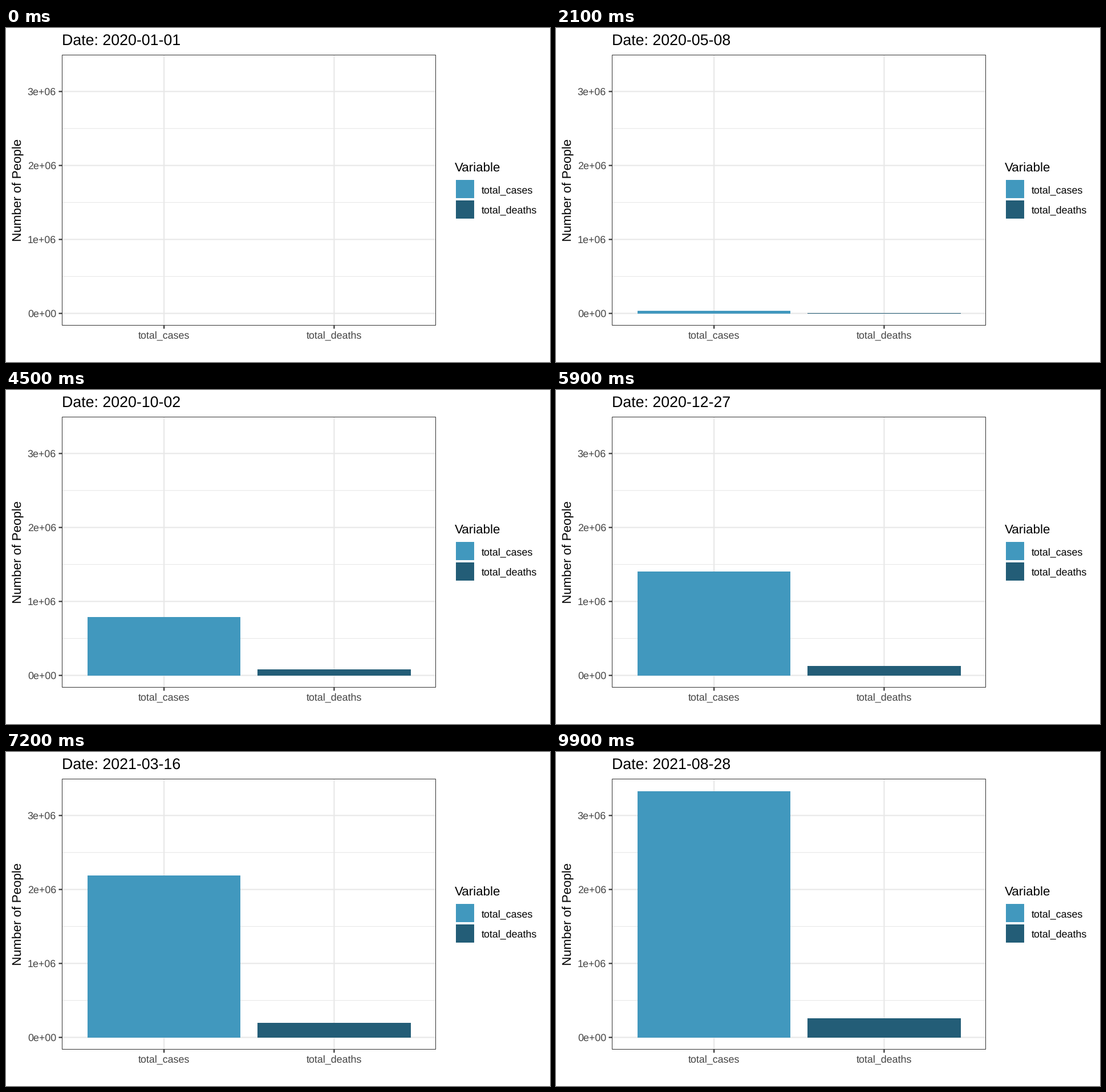
Write a matplotlib script that moves like this. It is 954 px wide and 587 px high and loops after 10 s.

```python
import numpy as np
import matplotlib
import matplotlib.pyplot as plt
from matplotlib.animation import FuncAnimation
from matplotlib.patches import Rectangle

matplotlib.rcParams["font.family"] = "Liberation Sans"
matplotlib.rcParams["text.hinting"] = "none"

W, H, DPI = 954, 587, 128
PT = 72 / DPI  # points per pixel
FRAMES, LAST_DAY = 100, 605
STEP = LAST_DAY / (FRAMES - 1)
START = np.datetime64("2020-01-01")

LIGHT, DARK = "#4198BE", "#235D77"
GRID, INK, LABEL = "#E8E8E8", "#333333", "#444444"
SMALL, MEDIUM, LARGE = 17.9, 22.4, 26.8

LEFT, RIGHT, TOP, BOTTOM = 98, 754, 47, 523
ZERO, UNIT = 501.6, 0.13  # baseline and pixels per thousand people
CENTERS, BAR_W = (277.1, 575.4), 268.4
NAMES, COLORS = ("total_cases", "total_deaths"), (LIGHT, DARK)

# Turning points of the waves, totals in thousands
DAYS = np.array([0, 80, 130, 165, 225, 278, 320, 363, 397, 443, 486, 534,
                 567, LAST_DAY])
CASES = np.array([0, 0, 35, 146, 502, 790, 1012, 1402, 1870, 2188, 2348,
                  2472, 2694, 3329])
DEATHS = np.array([0, 0, 3.5, 17.6, 55, 82, 99, 124, 159, 197, 217, 231,
                   237, 258])

fig = plt.figure(figsize=(W / DPI, H / DPI), dpi=DPI, facecolor="white")
ax = fig.add_axes([0, 0, 1, 1])
ax.set_xlim(0, W)
ax.set_ylim(H, 0)
ax.axis("off")


def smooth(day, values):
    """Cubic curve through the turning points, never below zero."""
    slopes = np.gradient(values, DAYS)
    i = min(np.searchsorted(DAYS, day, side="right"), len(DAYS) - 1) - 1
    h, rise = DAYS[i + 1] - DAYS[i], values[i + 1] - values[i]
    t = (day - DAYS[i]) / h
    bend = ((1 - t) * (h * slopes[i] - rise)
            - t * (h * slopes[i + 1] - rise))
    return max(0, values[i] + t * rise + t * (1 - t) * bend)


def text(x, y, s, size, color="black", **kw):
    return ax.text(x, y, s, fontsize=size * PT, color=color,
                   va="baseline", **kw)


def line(xs, ys, color, width):
    ax.plot(xs, ys, color=color, lw=width * PT, zorder=1,
            solid_capstyle="butt", snap=False)


def box(x, y, w, h, color):
    return ax.add_patch(Rectangle((x, y), w, h, facecolor=color, lw=0,
                                  edgecolor="none", zorder=3, snap=True))


# Grid, ticks and axis labels
for k in range(7):
    y = ZERO - 500 * k * UNIT
    if k % 2:
        line((LEFT, RIGHT), (y, y), GRID, 1.1)
        continue
    line((LEFT, RIGHT), (y, y), GRID, 2.17)
    line((92.5, LEFT), (y, y), INK, 2.17)
    text(88, y + 6.4, f"{k // 2}e+0{6 if k else 0}", SMALL, LABEL,
         ha="right")
for x, name in zip(CENTERS, NAMES):
    line((x, x), (TOP, BOTTOM), GRID, 2.17)
    line((x, x), (BOTTOM, 528.5), INK, 2.17)
    text(x, 545, name, SMALL, LABEL, ha="center")
text(27.4, 285, "Number of People", MEDIUM, rotation=90,
     rotation_mode="anchor", ha="center")

# Panel border, one pixel just inside the panel
ax.add_patch(Rectangle((LEFT + .5, TOP + .5), RIGHT - LEFT - 1,
                       BOTTOM - TOP - 1, fill=False, edgecolor=INK,
                       lw=PT, zorder=4, snap=False))

# Legend
text(787, 253, "Variable", MEDIUM)
for k, (name, color) in enumerate(zip(NAMES, COLORS)):
    y = 267.4 + 35.2 * k
    box(789, y, 32, 32, color)
    text(833.7, y + 22.9, name, SMALL)

title = text(LEFT, 30.7, "", LARGE)
bars = [box(x - BAR_W / 2, ZERO, BAR_W, 0, c)
        for x, c in zip(CENTERS, COLORS)]


def update(i):
    title.set_text(f"Date: {START + int(round(i * STEP))}")
    # the bars show the latest day that rounds to this step
    day = min(int((i + .5) * STEP), LAST_DAY)
    for bar, values in zip(bars, (CASES, DEATHS)):
        bar.set_height(-UNIT * smooth(day, values))
    return [title, *bars]


anim = FuncAnimation(fig, update, frames=FRAMES, interval=100,
                     repeat=True, repeat_delay=0, blit=False)
plt.show()
```
